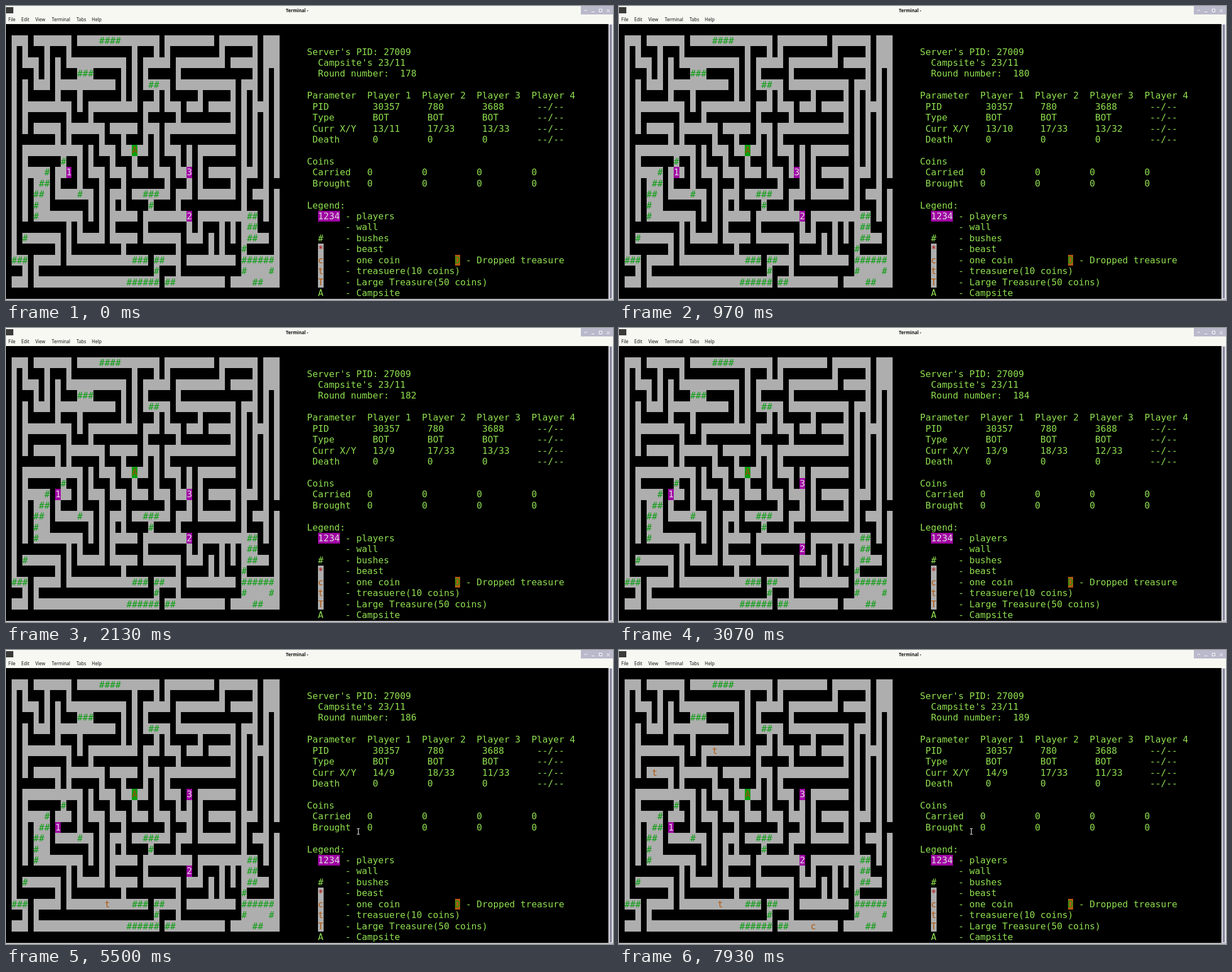
Animation, 1076 px wide and 521 px high, one loop 8 s. Source, as an HTML page with a canvas:

```html
<!DOCTYPE html>
<html>
<head>
<meta charset="utf-8">
<title>Terminal</title>
<style>
  html, body { margin: 0; width: 100%; height: 100%; overflow: hidden; background: #000; }
  canvas { display: block; }
</style>
</head>
<body>
<canvas id="stage" width="1076" height="521"></canvas>
<script>
const ctx = document.getElementById('stage').getContext('2d');
const LOOP = 8000, CELL_W = 9.702, CELL_H = 19.43, TOP = 32.5;
const GRAY = '#aeaeae', LIME = '#90e150', GREEN = '#0b9e12', PURPLE = '#a000a4', BROWN = '#b3590f';

// o = floor, # = bush, blank = wall
const maze = [
  'ooo ooooooo oooo####ooooooo ooooooooo ooooooo ooo',
  'o o   o   o           o   o o         o     o ooo',
  'o ooo o o ooooooooooo o ooooo ooooooooo ooooo ooo',
  'o   o o o   ###     o o o     o             o o o',
  'o o ooo ooooooooooo o o o##oo ooooooooooo ooo o o',
  'o o     o   o       o o   o o     o     o o o o o',
  'o ooooooooo o ooooooooo ooo ooo ooo ooooo o ooo o',
  'o o       o   o         o     o         o o o o o',
  'o o ooooo ooooooo ooooo ooo ooooooooooooo o o o o',
  'o       o o     o   o   o o o             o o o o',
  'o ooooooooooo o ooo ooooo o ooo o ooooooo o o o o',
  'o o      #  o o   o   o   o   o o o       o o o o',
  'o oooo# ooo o ooo ooo ooo ooo ooo o ooooo ooo o o',
  'o o o## o   o   o   o       o   o o     o o   o  ',
  'o o ##o oooo#oo o ooo oo###oo ooo ooooooo o ooo o',
  'o o #oo       o o o o    #    o           o   o o',
  'o o #oooooooo o o ooooo ooooooooo ooooooooo## o o',
  'o         o o   o o     o       o o   o o o##   o',
  'o #oooooo o ooooo ooooo ooooooo ooo o o o o##oo o',
  'o       o o         o         o     o o   #     o',
  '### ooooo oooooooooooo### ##ooo ooooooooo ######o',
  '  o o                     #   o           #oooo#o',
  'ooo ooooooooooooooooo###### ##ooooooooo oooo##ooo'
];

const panel = {
  2: "Server's PID: 27009",
  3: "  Campsite's 23/11",
  4: '  Round number:',
  6: 'Parameter  Player 1  Player 2  Player 3  Player 4',
  7: ' PID        30357     780       3688      --/--',
  8: ' Type       BOT       BOT       BOT       --/--',
  9: ' Curr X/Y                                 --/--',
  10: ' Death      0         0         0         --/--',
  12: 'Coins',
  13: ' Carried   0         0         0         0',
  14: ' Brought   0         0         0         0',
  16: 'Legend:',
  17: '       - players',
  18: '       - wall',
  19: '  #    - bushes',
  20: '       - beast',
  21: '       - one coin            - Dropped treasure',
  22: '       - treasuere(10 coins)',
  23: '       - Large Treasure(50 coins)',
  24: '  A    - Campsite'
};

// Each step: start time, round, then [column, row] of the three players
const steps = [
  [0, 178, [11, 13], [33, 17], [33, 13]],
  [300, 180, [10, 13], [33, 17], [32, 13]],
  [1700, 182, [9, 13], [33, 17], [33, 13]],
  [2560, 184, [9, 13], [33, 18], [33, 12]],
  [4270, 185, [9, 14], [33, 18], [33, 11]],
  [5100, 186, [9, 14], [33, 18], [33, 11]],
  [6000, 187, [9, 14], [33, 17], [33, 11]],
  [6830, 188, [9, 14], [33, 17], [33, 11]],
  [7600, 189, [9, 14], [33, 17], [33, 11]]
];

// Treasures: time of appearance, column, row, letter
const treasures = [[5100, 18, 21, 't'], [6830, 6, 9, 't'], [7730, 17, 7, 't'], [7730, 35, 23, 'c']];

function rect(x, y, w, h, color) {
  ctx.fillStyle = color;
  ctx.fillRect(x, y, w, h);
}

function fillCell(col, row, color) {
  const x = Math.round(col * CELL_W), y = Math.round(TOP + row * CELL_H);
  rect(x, y, Math.round((col + 1) * CELL_W) - x, Math.round(TOP + (row + 1) * CELL_H) - y, color);
}

function put(col, row, text, color = LIME, back) {
  ctx.font = '16.1px "DejaVu Sans Mono", monospace';
  [...String(text)].forEach((ch, i) => {
    if (back) fillCell(col + i, row, back);
    if (ch === ' ') return;
    ctx.fillStyle = color;
    ctx.fillText(ch, (col + i) * CELL_W, TOP + row * CELL_H + 15.2);
  });
}

function drawWindow() {
  rect(0, 0, 1076, 32, '#f8f8f3');
  rect(0, 2, 13, 11, '#3a3a38');
  rect(1019, 0, 57, 15, '#b9b9cb');
  ctx.fillStyle = '#111';
  ctx.font = 'bold 8px "Noto Sans", sans-serif';
  ctx.fillText('Terminal -', 496, 11);
  ctx.font = '8px "Noto Sans", sans-serif';
  [['File', 4], ['Edit', 27], ['View', 52], ['Terminal', 81], ['Tabs', 125], ['Help', 152]]
    .forEach(([label, x]) => ctx.fillText(label, x, 27));
  ctx.strokeStyle = '#fff';
  ctx.lineWidth = 1;
  ctx.beginPath();
  ctx.moveTo(1025, 9); ctx.lineTo(1027.5, 6.5); ctx.lineTo(1030, 9);
  ctx.moveTo(1038, 10.5); ctx.lineTo(1043, 10.5);
  ctx.rect(1051.5, 5.5, 5, 5);
  ctx.moveTo(1065, 6); ctx.lineTo(1070, 11);
  ctx.moveTo(1070, 6); ctx.lineTo(1065, 11);
  ctx.stroke();
  rect(1068, 32, 8, 489, '#e4e4ea');
  rect(1070, 33, 4, 485, '#8c8ca0');
  rect(0, 519, 1076, 2, '#bdbdc2');
}

function drawMaze() {
  maze.forEach((line, r) => [...line].forEach((ch, c) => {
    if (ch === ' ') return;
    fillCell(c + 1, r + 1, GRAY);
    if (ch === '#') put(c + 1, r + 1, ch, GREEN);
  }));
  put(23, 11, 'A', '#a04a08', '#08a010');
}

function drawPanel() {
  for (const row in panel) put(55, +row, panel[row]);
  put(57, 17, '1234', '#ddd', PURPLE);
  put(57, 20, '*', '#b01010', GRAY);
  ['c', 't', 'T'].forEach((ch, i) => put(57, 21 + i, ch, BROWN, GRAY));
  put(82, 21, 'D', GREEN, BROWN);
}

function drawPointer() {
  rect(624, 317, 1, 9, '#fff');
  rect(622, 316, 5, 1, '#ddd');
  rect(622, 326, 5, 1, '#ddd');
}

function draw(now) {
  const t = now % LOOP;
  const [, round, ...players] = steps.filter(s => s[0] <= t).pop();
  rect(0, 0, 1076, 521, '#000');
  drawWindow();
  drawMaze();
  drawPanel();
  put(72, 4, round);
  for (const [start, col, row, letter] of treasures)
    if (t >= start) put(col, row, letter, BROWN);
  players.forEach(([col, row], i) => {
    put(col, row, i + 1, '#e6dce6', PURPLE);
    put(67 + 10 * i, 9, row + '/' + col);
  });
  if (t >= 4270) drawPointer();
  requestAnimationFrame(draw);
}
requestAnimationFrame(draw);
</script>
</body>
</html>
```
